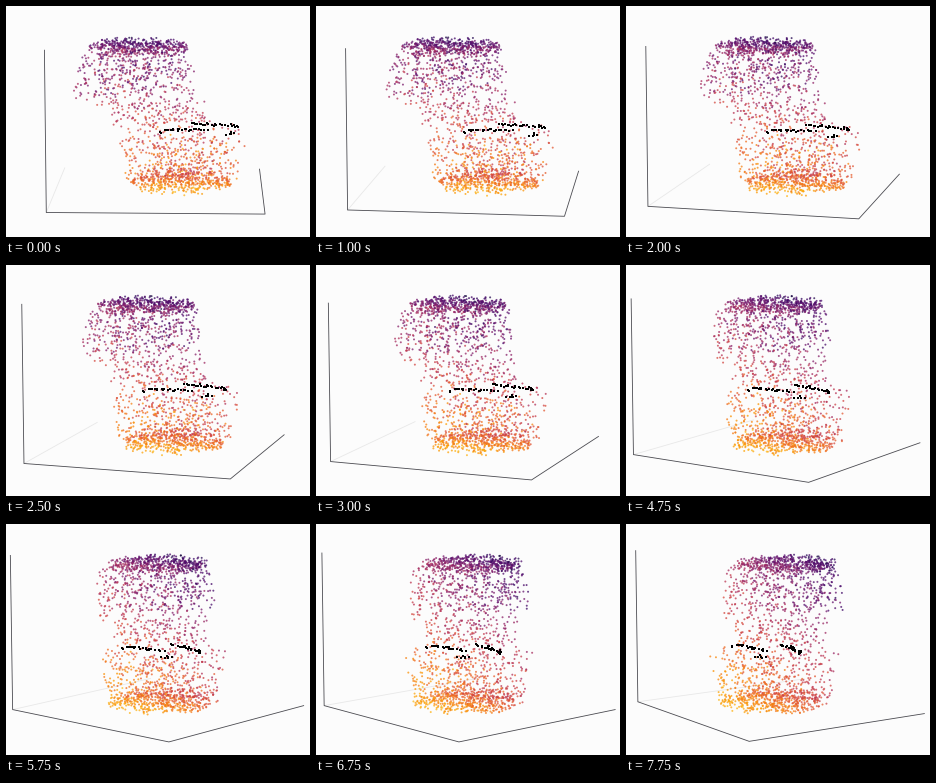
A matplotlib script that plays this animation: 304 by 231 pixels, repeating every 8000 ms.

```python
import numpy as np
import matplotlib.pyplot as plt
from matplotlib.animation import FuncAnimation

W, H, DPI = 304, 231, 100
FRAMES, INTERVAL = 32, 250
ELEV = np.radians(10)
SCALE, DISTANCE, CENTER = 1746, 10, (152.9, 107.5)
HALF, HALF_Z = 0.595, 0.446
BACKGROUND = "#fcfcfc"

rng = np.random.default_rng(7)


def project(points, turn):
    """Perspective view of (right, toward viewer, up) points turned about the vertical."""
    x, d, z = np.asarray(points, float).T
    right = x * np.cos(turn) - d * np.sin(turn)
    near = d * np.cos(turn) + x * np.sin(turn)
    up = z * np.cos(ELEV) - near * np.sin(ELEV)
    depth = DISTANCE - near * np.cos(ELEV) - z * np.sin(ELEV)
    return np.column_stack([CENTER[0] + SCALE * right / depth,
                            CENTER[1] - SCALE * up / depth])


def disc(count, radius, shift):
    angle = rng.uniform(0, 2 * np.pi, count)
    r = radius * np.sqrt(rng.random(count))
    return r * np.cos(angle) + shift[0], r * np.sin(angle) + shift[1]


def lobe(side):
    """Upper (side=1) or lower (side=-1) half: flat cap, body and thin waist."""
    cap_z = 0.385 - 0.045 * rng.random(410) ** 1.5
    body_z = 0.04 + 0.33 * rng.random(480) ** 0.75
    waist_z = 0.07 * rng.random(75)
    parts = [
        (cap_z, 0.29, (-0.125, -0.14)),
        (body_z, 0.365 - 0.16 * np.maximum(body_z - 0.1, 0), (-0.14, -0.125)),
        (waist_z, 0.28, (0, 0)),
    ]
    cloud = [np.column_stack([*disc(len(z), r, shift), z]) for z, r, shift in parts]
    return side * np.vstack(cloud) * [1, 1, 1]


def strip(start, end, count):
    t = np.linspace(0, 1, count)[:, None]
    plan = np.array(start) * (1 - t) + np.array(end) * t
    plan += rng.normal(0, 0.008, plan.shape)
    return np.column_stack([plan, -0.04 + rng.normal(0, 0.004, count)])


cloud = rng.permutation(np.vstack([lobe(1), lobe(-1)]))
level = 0.5 - 0.3 * cloud[:, 2] + 0.5 * cloud[:, 1] + rng.normal(0, 0.03, len(cloud))

marks = np.vstack([
    strip((0.02, 0.33), (0.15, 0.28), 15),
    strip((0.16, 0.30), (0.27, 0.27), 10),
    strip((0.19, 0.12), (0.30, 0.10), 11),
    strip((0.31, 0.12), (0.36, 0.13), 6),
    strip((0.39, 0.12), (0.45, 0.17), 8),
    strip((0.38, 0.42), (0.43, 0.38), 6),
])

left, front, right, back = [(sx * HALF, sd * HALF, -HALF_Z)
                            for sx, sd in [(-1, 1), (1, 1), (1, -1), (-1, -1)]]
frame_edges = [(left[0], left[1], HALF_Z), left, front, right]

fig = plt.figure(figsize=(W / DPI, H / DPI), dpi=DPI, facecolor=BACKGROUND)
ax = fig.add_axes([0, 0, 1, 1])
ax.set(xlim=(0, W), ylim=(H, 0))
ax.axis("off")

faint_line, = ax.plot([], [], color="#e8e8e8", lw=0.6, zorder=1)
axis_line, = ax.plot([], [], color="#4a4a50", lw=0.6, zorder=2)
dots = ax.scatter(*cloud[:, :2].T, c=level, cmap="inferno", vmin=0, vmax=1,
                  s=2.1, lw=0, alpha=0.75, zorder=3)
squares = ax.scatter(*marks[:, :2].T, c="black", marker="s", s=4.6, lw=0, zorder=4)


def draw(frame):
    # The first view is held for one extra frame.
    turn = np.radians(1.8 * (max(frame - 1, 0) + 1))
    faint_line.set_data(*project([left, back], turn).T)
    axis_line.set_data(*project(frame_edges, turn).T)
    dots.set_offsets(project(cloud, turn))
    squares.set_offsets(project(marks, turn))
    return faint_line, axis_line, dots, squares


anim = FuncAnimation(fig, draw, frames=FRAMES, interval=INTERVAL,
                     repeat=True, repeat_delay=0)
plt.show()
```
